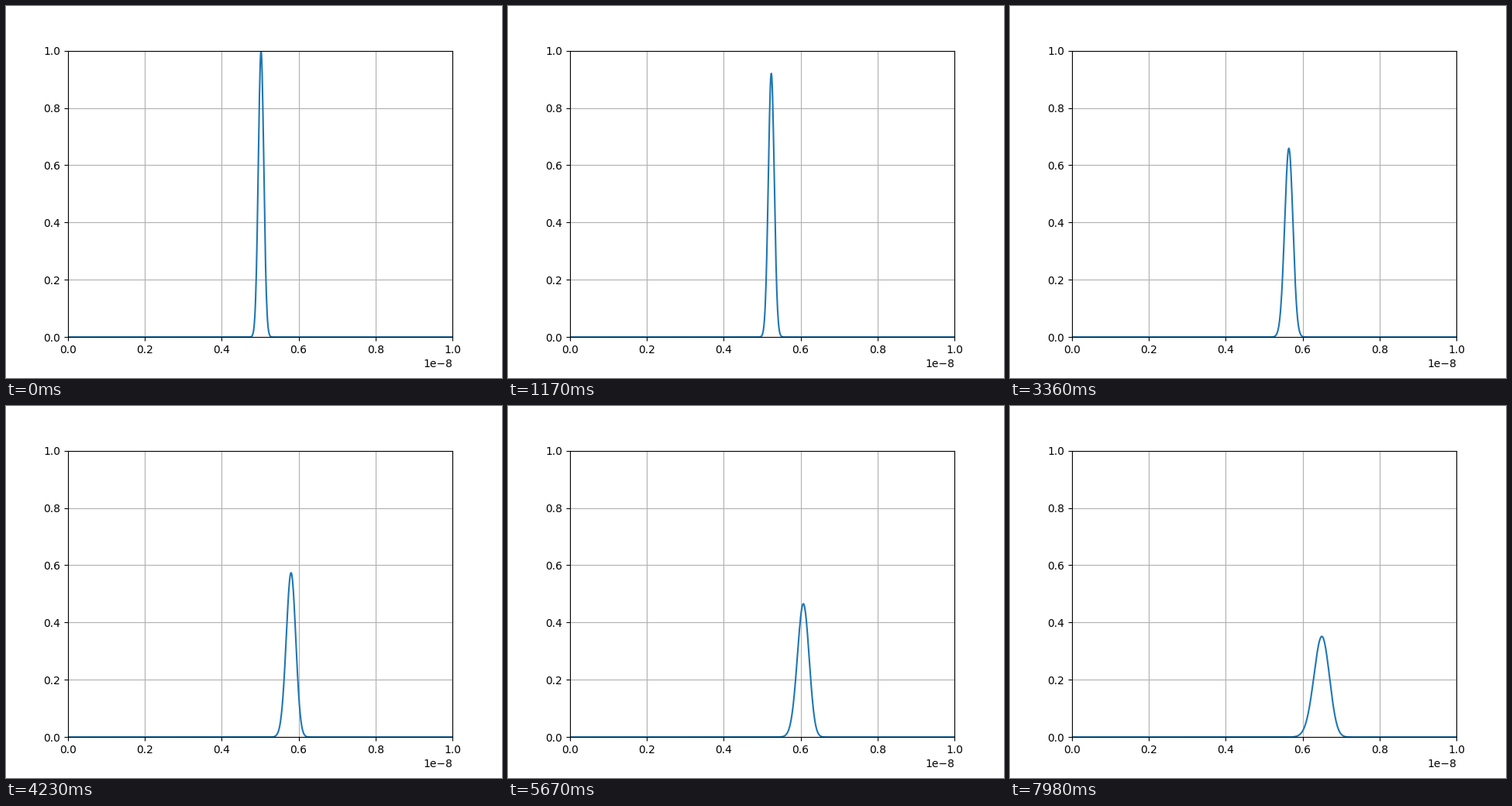
These frames come from a looping animation (640x480 px, 8000 ms). A matplotlib script:

```python
"""Free electron wave packet, stepped with the Crank-Nicolson scheme."""
import numpy as np
import matplotlib.pyplot as plt
from matplotlib.animation import FuncAnimation

HBAR = 1.054571817e-34
MASS = 9.1093837e-31

LENGTH = 1e-8
CELLS = 1000
DX = LENGTH / CELLS
DT = 1e-18        # time per step
WIDTH = 1e-10
K0 = 5e10         # mean wave number

LOOP_MS = 8000
TICK_MS = 20
STEP_MS = 30      # time each step stays on screen
FIRST_STEP = 4

x = np.linspace(0, LENGTH, CELLS + 1)
offset = x - LENGTH / 2
psi0 = np.exp(-offset**2 / (2 * WIDTH**2) + 1j * K0 * offset)

# Phase gained per step by each lattice mode
spectrum = np.fft.fft(psi0)
k = 2 * np.pi * np.fft.fftfreq(x.size, DX)
omega = HBAR / (MASS * DX**2) * (1 - np.cos(k * DX))
phase = -2 * np.arctan(omega * DT / 2)


def density(step):
    psi = np.fft.ifft(spectrum * np.exp(1j * phase * step))
    return np.abs(psi)**2


fig, ax = plt.subplots(figsize=(6.4, 4.8), dpi=100)
line, = ax.plot(x, density(FIRST_STEP))
ax.set_xlim(0, LENGTH)
ax.set_ylim(0, 1)
ax.grid(True)


def update(tick):
    # Take the step shown at the middle of the tick
    step = (tick * TICK_MS + TICK_MS // 2) // STEP_MS
    line.set_ydata(density(FIRST_STEP + step))
    return line,


anim = FuncAnimation(fig, update, frames=LOOP_MS // TICK_MS,
                     interval=TICK_MS, repeat=True, repeat_delay=0)
plt.show()
```
